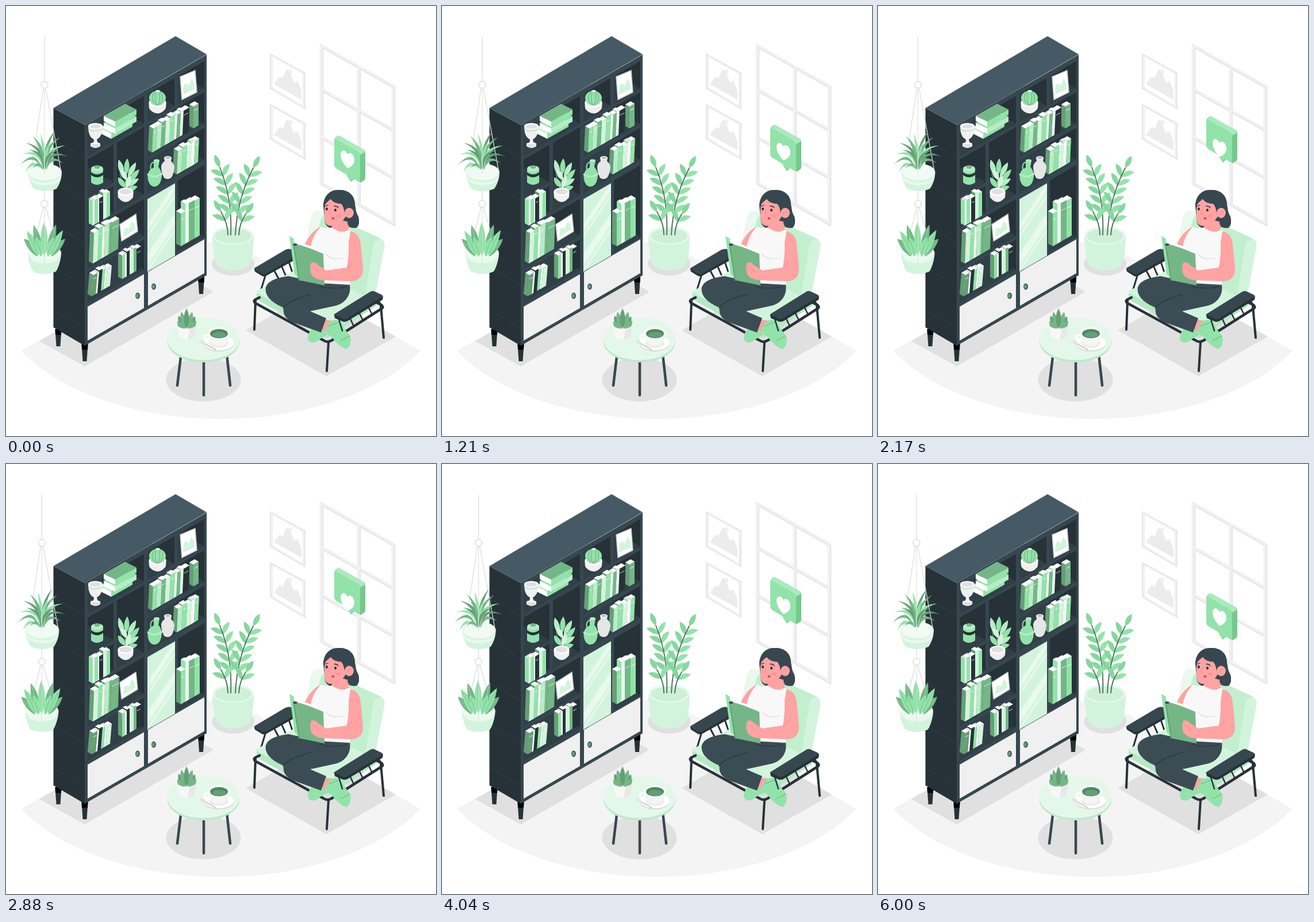
Recreate the animation shown at these times as an HTML page. Size 748 by 748 pixels, loop 6.04 s.

```html
<!DOCTYPE html>
<html lang="en">
<head>
<meta charset="utf-8">
<title>Reading corner</title>
<style>
html, body { margin: 0; width: 100%; height: 100%; overflow: hidden; background: #fff; }
svg { display: block; width: 100vw; height: 100vh; }
</style>
</head>
<body>
<svg id="stage" viewBox="0 0 748 748"></svg>
<script>
const C = {
  a: '#92e3a9', b: '#75b687', c: '#d3f4dc', d: '#263238', e: '#e9f9ee', f: '#669f76',
  g: '#b7ecc6', w: '#f7f7f7', front: '#37474f', top: '#455a64',
  skin: '#ffa3a3', blush: '#f28f8f', grey: '#e0e0e0', pale: '#f0f0f0'
};

// drawing helpers, all returning markup
const path = (d, fill, extra = '') => `<path d="${d}" fill="${fill}" ${extra}/>`;
const line = (d, stroke, width = 1, extra = '') =>
  `<path d="${d}" fill="none" stroke="${stroke}" stroke-width="${width}" stroke-linecap="round" stroke-linejoin="round" ${extra}/>`;
const poly = (pts, fill, extra = '') => `<polygon points="${pts}" fill="${fill}" ${extra}/>`;
const oval = (x, y, rx, ry, fill, extra = '') =>
  `<ellipse cx="${x}" cy="${y}" rx="${rx}" ry="${ry}" fill="${fill}" ${extra}/>`;
const group = (s, attr) => `<g ${attr}>${s}</g>`;

function leaf(x0, y0, x1, y1, w, bend, fill) {
  const dx = x1 - x0, dy = y1 - y0, len = Math.hypot(dx, dy);
  const ctrl = k => `${(x0 + x1) / 2 - dy / len * k} ${(y0 + y1) / 2 + dx / len * k}`;
  return path(`M${x0} ${y0}Q${ctrl(bend + w)} ${x1} ${y1}Q${ctrl(bend - w)} ${x0} ${y0}Z`, fill);
}

// points on the shelf front: u across, v down
const SLOPE = 0.578;
const at = (u, v) => `${137 + u},${(207 + v - SLOPE * u).toFixed(1)} `;
const face = (u0, v0, u1, v1, fill) => poly(at(u0, v0) + at(u1, v0) + at(u1, v1) + at(u0, v1), fill);

function cell(u0, v0, u1, v1) {
  const d = Math.min(55, u1 - u0, (v1 - v0) / (2 * SLOPE)), back = v1 - d * 2 * SLOPE;
  return face(u0, v0, u1, v1, C.d) +
    poly(at(u0, v1) + at(u1, v1) + at(u1 - d, back) + at(u0, back), '#314047');
}

// spec: width, colour key and height change of each spine, from the left
function books(x, y, h, spec, lean = 0, depth = 7) {
  const drop = depth * SLOPE;
  let out = '';
  for (const item of spec.split(' ')) {
    const [, w, key, dh] = item.match(/(\d+)(\w)(.*)/);
    const W = +w, H = h + +dh, x2 = x + W, y2 = y - W * SLOPE, l = lean;
    const side = poly(`${x},${y} ${x + l},${y - H} ${x + l - depth},${y - H - drop} ${x - depth},${y - drop}`,
      key === 'd' ? '#1c262b' : key === 'w' || key === 'e' ? C.a : C.f);
    const spine = poly(`${x},${y} ${x2},${y2} ${x2 + l},${y2 - H} ${x + l},${y - H}`, C[key]);
    const pages = poly(`${x + l},${y - H} ${x2 + l},${y2 - H} ${x2 + l - depth},${y2 - H - drop} ${x + l - depth},${y - H - drop}`,
      key === 'w' ? '#e4e4e4' : '#fff');
    const band = W > 6 ? line(`M${x + l * .8 + 1.5} ${y - H * .8 - 1}L${x2 + l * .8 - 1.5} ${y2 - H * .8 + 1}`,
      key === 'w' || key === 'e' ? C.b : '#fff', 1.2, 'opacity=".6"') : '';
    out = side + spine + pages + band + out;
    x = x2; y = y2;
  }
  return out;
}

function flatBook(x, y, fill, edge) {
  return poly(`${x},${y} ${x + 20},${y + 10} ${x + 20},${y + 19} ${x},${y + 9}`, '#fff') +
    poly(`${x + 20},${y + 10} ${x + 57},${y - 11} ${x + 57},${y - 2} ${x + 20},${y + 19}`, edge) +
    poly(`${x},${y} ${x + 37},${y - 21} ${x + 57},${y - 11} ${x + 20},${y + 10}`, fill);
}

function photo(a, b, c, d, m) {
  return poly(`${a} ${b} ${c} ${d}`, '#fff', `stroke="#c9c9c9" stroke-width="1.5"`) + path(m, C.c);
}

function pot(x, top, bottom, r, ry, fill, rim, inside) {
  const k = r * .68;
  return path(`M${x - r} ${top}C${x - r} ${top + 14} ${x - k - 3} ${bottom - 8} ${x - k} ${bottom - 4}Q${x} ${bottom + 4} ${x + k} ${bottom - 4}C${x + k + 3} ${bottom - 8} ${x + r} ${top + 14} ${x + r} ${top}Z`, fill) +
    oval(x, top, r, ry, rim) + oval(x, top, r - 3, ry - 2, inside);
}

function floor() {
  return path('M373.5 400L26 600A397 229 0 0 0 721 600Z', '#f4f4f4') +
    poly('58,583 137,627 361,497 282,453', C.grey) +
    poly('417,564 557,644 678,575 538,495', C.grey) +
    oval(343.5, 650, 65, 38, C.grey) + oval(395, 448, 37, 21, C.grey);
}

function wall() {
  const frame = y => {
    const p = s => `M${459 + s} ${y + s * 1.4}L${521 - s} ${y + 34 + s * .4}V${y + 98 - s * 1.4}L${459 + s} ${y + 62 - s * .4}Z`;
    return path(p(0), '#e6e6e6') + path(p(2), '#f0f0f0') + path(p(5), '#fff') +
      path(`M466 ${y + 54}L475 ${y + 42}Q478 ${y + 40} 481 ${y + 44}L487 ${y + 30}Q490 ${y + 26} 494 ${y + 33}L501 ${y + 52}L504 ${y + 49}Q507 ${y + 48} 509 ${y + 53}L514 ${y + 66}V${y + 81}Z`, '#ececec') +
      oval(495, y + 32, 3, 4, '#f0f0f0');
  };
  const grid = 'M3 4H128V243H3ZM68 4V243M3 80H128M3 163H128';
  return frame(82) + frame(170) +
    group(line(grid, '#e6e6e6', 6.5) + line(grid, '#f2f2f2', 3.5, 'transform="translate(-1 -1)"'),
      'transform="matrix(1 .565 0 1 546 64)"');
}

function shelf() {
  let s = '';
  for (const [x, y] of [[91, 562], [137, 588], [339.5, 471]])
    s += poly(`${x - 5.5},${y} ${x + 5.5},${y} ${x + 3.5},${y + 30} ${x - 3.5},${y + 30}`, C.d) +
      poly(`${x - 5.5},${y} ${x + 5.5},${y} ${x + 5},${y + 10} ${x - 5},${y + 10}`, '#000');
  s += poly('82.5,177.5 137,207 137,591 82.5,559', C.d) + poly('82.5,177.5 295,52.5 349,84 137,207', C.top) +
    face(0, 0, 212, 384, C.front);
  for (const y of [264, 338, 412, 486, 560]) s += line(`M83 ${y - 31}L137 ${y}`, '#36444b', .8);
  const cells = [
    [5, 9, 103, 57], [5, 63, 50, 129], [5, 135, 50, 181], [56, 63, 103, 181], [5, 188, 103, 252],
    [5, 259, 103, 311], [109, 9, 156, 57], [162, 9, 208, 57], [109, 63, 208, 118],
    [109, 125, 208, 181], [162, 190, 208, 315]
  ];
  for (const c of cells) s += cell(...c);

  s += face(5, 319, 103, 378, C.pale) + face(110, 319, 208, 378, C.pale) + face(109, 192, 157, 318, C.c);
  for (const [v, h] of [[214, 12], [232, 5], [266, 20], [292, 5]])
    s += poly(at(109, v + 22) + at(157, v - 22) + at(157, v - 22 + h) + at(109, v + 22 + h), C.e);
  for (const [x, y] of [[229, 504], [257, 488]])
    s += oval(x, y, 4, 5.6, '#455a64') + oval(x - .6, y, 2.4, 3.6, C.f);

  // upper left: stacked books and a trophy
  s += flatBook(163, 212, C.c, C.a) + flatBook(170, 203, C.a, C.g) + flatBook(170, 191, C.b, C.a);
  s += path('M143 209Q143 228 153 232L152 240H160L158 232Q168 227 168 209Z', C.pale) +
    oval(155.5, 209, 12.5, 5.5, '#fff') + oval(155.5, 209.5, 10, 4, C.grey) +
    line('M145 214Q150 220 166 215', C.g, 2) +
    path('M147 239Q156 235 164 239V244Q156 250 147 244Z', '#fff') + oval(155.5, 243, 8, 3.5, C.grey);

  // tin
  s += path('M148 283V307Q158 315 169 307V283Z', C.a) + oval(158.5, 283, 10.5, 5.5, C.g) +
    path('M148 289Q158 297 169 289V294Q158 302 148 294Z', C.d) + oval(158.5, 280, 5, 3, C.b);

  // potted leaves
  s += line('M208 322Q204 295 212 270M208 322Q212 300 226 287M208 320Q198 304 198 280', C.f, 1.2);
  for (const [x0, y0, x1, y1, k] of [[209, 294, 211, 265, 'a'], [204, 296, 196, 267, 'g'], [210, 303, 200, 284, 'c'],
    [212, 298, 226, 272, 'g'], [212, 308, 232, 284, 'a'], [209, 314, 231, 300, 'g'], [207, 316, 195, 298, 'a'], [209, 318, 216, 294, 'c'], [209, 320, 229, 314, 'a']])
    s += leaf(x0, y0, x1, y1, 9, 0, C[k]);
  s += pot(208, 323, 341, 13.5, 7, C.pale, '#fff', C.grey);

  // upright books
  s += books(151, 382, 43, '3w 6a 2w 7d-2 6c3 6a-1');
  s += books(151, 448, 53, '8c 7a4 4w 8g3 4b2 13b', 2);
  s += books(149, 505, 37, '7f 3w 6d2 5a 3w 8c-2', 3);
  s += books(202, 475, 41, '5a 3w 5d2 7c-1 5b 8d-3');
  s += books(254, 255, 42, '7a 8g 7b2 8c 8a3 4w 6b 5e2 10d', 2);
  s += books(326, 213, 38, '9b', 0);
  s += books(297, 293, 41, '8g 8a2 8c-2 6w1 7a', 2);
  s += books(304, 418, 57, '8a 6e12 10b10 9a8', 0, 8);

  // photos, cactus and vases
  s += photo('303,123', '329,112', '332,150', '306,163', 'M308 154L309 138L314 134L318 139L323 126L328 136V145Z');
  s += photo('198,380', '226,362', '229,392', '201,409', 'M204 402L205 389L209 385L213 388L219 374L224 380L225 389Z');
  s += pot(263.5, 168, 187, 15, 8, C.pale, '#fff', C.grey) + oval(263.5, 160, 14.5, 12.5, C.a);
  for (const r of [4, 9]) s += oval(263.5, 160, r, 12, 'none', `stroke="${C.b}" stroke-width="1.2"`);
  s += oval(264, 148, 4, 2, C.c);
  s += path('M257 269H267L265 280Q271 287 271 295Q270 309 263 313Q256 316 251 311Q245 303 247 292Q249 284 257 281Z', C.a) +
    oval(262, 269, 5, 2.5, C.g) + line('M257 272Q250 273 252 285', C.a, 2) + line('M247 293Q258 301 271 292', C.g, 3);
  s += path('M275 264H288L287 270Q293 275 293 281Q291 295 287 299Q281 303 275 299Q270 290 270 279Q271 273 276 270Z', '#e6e6e6') +
    oval(281.5, 264, 6.5, 3, '#fff') + oval(281.5, 264, 4.5, 2, '#bdbdbd');
  return s;
}

function floorPlant() {
  let s = '';
  // leaves in pairs along curved stems
  const stem = (x0, y0, cx, cy, x1, y1, n, from) => {
    let leaves = '';
    for (let i = 0; i <= n; i++) {
      const t = from + (1 - from) * i / n, q = 1 - t;
      const x = q * q * x0 + 2 * q * t * cx + t * t * x1, y = q * q * y0 + 2 * q * t * cy + t * t * y1;
      const dir = Math.atan2(q * (cy - y0) + t * (y1 - cy), q * (cx - x0) + t * (x1 - cx));
      const len = 27 - 3 * t;
      for (const side of i === n ? [0] : [-1, 1]) {
        const a = dir + side * .8;
        leaves += leaf(x, y, x + Math.cos(a) * len, y + Math.sin(a) * len, 9, side * -3, side > 0 ? C.a : '#86d79e');
      }
    }
    s += leaves + line(`M${x0} ${y0}Q${cx} ${cy} ${x1} ${y1}`, '#4a6b58', 1.8);
  };
  stem(391, 398, 394, 335, 372, 281, 5, .3);
  stem(399, 398, 402, 335, 430, 282, 5, .3);
  stem(386, 398, 386, 378, 374, 358, 1, .6);
  stem(405, 398, 406, 378, 417, 362, 1, .6);
  return path('M359 399C359 420 362 440 367 450Q378 460 395 460Q414 460 424 450C428 440 431 420 431 399Z', C.c) +
    oval(395, 399, 36, 16, C.e) + oval(395, 400, 32, 13, '#cdf0d7') + s;
}

function chair() {
  return line('M434 513L432 563M652 522L657 577M561 585L558 635', C.d, 4) +
    path('M520 420L531 367Q535 354 548 357L651 404Q660 409 658 420L641 510L590 530Z', '#c2efce') +
    path('M531 367Q535 354 548 357L560 362Q549 364 547 374L536 420L521 415Z', C.e) +
    path('M640 411Q647 407 651 404Q660 409 658 420L641 510L623 515Z', C.c) +
    line('M452 466L442 499M467 461L475 476M480 454L487 470M492 445L498 463', C.d, 3) +
    path('M436 496L520 450L650 518L566 572Q560 575 552 571L442 512Q435 508 436 496Z', C.c) +
    path('M436 499L554 560Q560 562 566 559L644 514L644 521L566 574Q560 578 552 574L442 514Q435 510 436 499Z', '#b4e9c3') +
    line('M441 507L433 511Q430 514 434 517L553 582Q559 586 566 582L654 526Q657 523 653 520L645 516', C.d, 4.5) +
    path('M432 456Q431 459 434 461L446 467Q451 468 455 465L500 439V424Q492 421 486 424Z', C.front) +
    path('M432 458L433 462L446 470Q451 471 455 468L500 443V438L455 464Q451 467 446 466Z', C.d);
}

function woman() {
  let s = '';
  // back hair, neck, far arm
  s += path('M555 376Q557 388 577 388L596 384Q606 388 611 385Q616 378 613 366C608 360 609 353 607 345C607 328 594 319 579 320C562 319 552 332 552 348Z', C.front);
  s += path('M545 385Q529 394 519 416L517 428L535 434L548 405Z', C.skin);
  s += path('M548 384Q559 389 574 383L594 389Q608 393 606 407L603 466L597 486Q562 489 540 478L529 445Q526 405 548 384Z', '#f8f8f8');
  s += path('M574 370L597 376L596 389Q584 398 566 385Z', C.skin);
  s += line('M557 432Q567 444 588 438', '#dedede', 1.2) + line('M531 418Q532 430 541 434', '#e3e3e3', 1.2);
  // legs
  s += path('M549 545L573 548L566 568L543 564Z', C.skin);
  s += path('M549 562L531 563Q523 571 526 582Q535 590 545 580L560 571Z', C.a);
  s += path('M452 497C449 482 464 473 492 470L545 482L598 485C601 505 588 517 575 521L529 531L557 543Q552 557 548 568L501 551Q480 542 483 525Q455 513 452 497Z', '#3b4c55');
  s += line('M482 526Q490 512 530 502M545 488Q570 494 593 488', C.d, 1.2);
  s += path('M559 555Q567 543 581 547Q588 562 599 574Q602 590 592 597Q578 592 566 575Q557 571 556 562Z', C.a);
  s += line('M582 582Q590 579 597 574M560 557Q570 553 582 549', C.b, 1.2);
  // book
  s += poly('493,400 501,405 511,477 502,466', C.a) + path('M499 407L509 410L548 425L553 431L511 420Z', '#fff') +
    path('M500 414Q510 413 552 431L554 486L510 477Z', C.b) + line('M500 414L510 477', C.f, 2) + oval(503, 415, 3.5, 2, C.front);
  // near arm
  s += path('M599 392Q615 395 617 414L621 455Q622 477 601 479L552 477Q537 476 531 467Q527 455 531 447Q537 444 542 450L557 460L593 455Q597 430 596 412Z', C.skin);
  s += line('M531 453Q538 456 545 463M594 455Q600 452 602 446', C.blush, 1.1);
  // face
  s += path('M555 345Q552 365 556 378Q562 386 576 380Q590 373 592 362L593 340L575 332L558 336Z', C.skin);
  s += path('M552 350C553 331 564 320 580 320C597 320 608 332 607 350L594 353L589 361Q588 349 583 344Q571 344 565 336Q558 340 552 350Z', C.front);
  s += oval(597, 360, 8, 9, C.skin) + line('M594 362Q597 356 601 358', C.blush, 1.2);
  s += path('M600 369Q607 364 606 350C609 360 615 367 614 378Q610 386 598 384Q592 380 595 371Z', C.front);
  s += oval(558, 353, 2, 2.6, C.d) + oval(573, 355, 2, 2.6, C.d);
  s += line('M555 348L560 346.5M571 348Q576 348 578 351', C.d, 1.3) + line('M564 354Q560 362 565 363', C.blush, 1.2);
  s += oval(569, 369.5, 2.5, 2, '#b8545c') + oval(578, 365, 4, 3, C.blush, 'opacity=".6"');
  // near armrest
  s += line('M579 545L585 565M597 540L604 555M613 531L620 545M629 521L636 535M646 510L653 520', C.d, 2.5);
  s += path('M571 536Q570 539 573 541L586 546Q590 547 594 545L655 507Q657 504 653 502L640 496Q636 495 632 498Z', C.front) +
    path('M571 537L572 543L586 549Q590 550 594 548L655 511L656 505L594 543Q590 546 586 544Z', C.d);
  return s;
}

function table() {
  let s = line('M304.5 606L298 660M344 617V677M384 606L390 660', C.front, 4.5) +
    oval(343.5, 583, 63, 37, '#bfe9cb') + oval(343.5, 579, 63, 37, '#e4f8ea');
  for (const [x, y, k] of [[300, 539, 'f'], [329, 540, 'f'], [305, 532, 'b'], [324, 532, 'b'], [314, 526, 'f'], [298, 549, 'b'], [331, 548, 'b']])
    s += leaf(314 + (x - 314) * .3, 562, x, y, 9, 0, C[k]);
  s += path('M298 557Q314 566 331 557L328 576Q314 585 301 576Z', '#f7f7f7') + path('M331 557L328 576Q323 580 316 580L320 561Z', '#e8e8e8');
  s += oval(370, 588, 26, 13, '#dadada') + oval(370, 586, 26, 13, '#fff') + oval(370, 587, 17, 8, '#eee');
  s += line('M353 573Q344 571 345 578Q348 585 357 582', '#fff', 3);
  s += path('M352 569Q352 584 361 589Q370 592 379 589Q389 584 389 569Z', '#f5f5f5') +
    oval(370.5, 569, 18.5, 10, '#fff') + oval(370.5, 570, 15.5, 8, '#4f8862') + oval(371, 572, 12, 5, C.f);
  s += line('M343 586L365 598', '#cfcfcf', 2) + oval(342, 585, 5, 2.5, '#e4e4e4', 'transform="rotate(28 342 585)"');
  return s;
}

function bubble() {
  return path('M571 233Q572 229 577 226Q579 225 582 227L621 249Q625 251 625 255V299Q625 302 622 304L617 307L606 300L600 306L594 297Z', '#74c98d') +
    path('M571 233L577 226Q579 225 582 227L621 249L625 254L616 259Z', '#a9ebbc') +
    path('M571 234Q571 230 575 232L612 253Q616 256 616 260V303Q616 307 612 305L604 300L599 305L592 293L575 283Q571 280 571 276Z', C.a);
}

function hanging() {
  const rope = '#dedede';
  let s = line('M67 54V131M65 143L44 284M69 143L95 284', rope, 1.3) + oval(67, 137, 6, 6, 'none', `stroke="${rope}" stroke-width="1.5"`);
  s += pot(68, 289, 322, 29, 15, C.c, C.e, '#f1fbf4') + path('M40 293Q44 306 68 307Q92 306 96 293L94 303Q88 311 68 312Q48 311 42 303Z', C.e);
  const tips = [[25, 276], [28, 258], [35, 238], [46, 226], [60, 222], [85, 217], [94, 228], [103, 243], [108, 262], [100, 274],
    [34, 290], [40, 250], [53, 238], [78, 234], [92, 250], [46, 282]];
  tips.forEach(([x, y], i) => {
    s += leaf(67 + (x - 67) * .1, 285, x, y, 5, (67 - x) * .75, [C.b, C.a, C.f][i % 3]);
  });
  s += line('M67 143V290', rope, 1.1) + line('M67 322V338M65 350L45 430M69 350L93 430', rope, 1.3) +
    oval(67, 344, 6, 6, 'none', `stroke="${rope}" stroke-width="1.5"`);
  s += pot(67, 429, 466, 29, 14, C.c, C.e, '#f1fbf4');
  for (const [x, y, k] of [[31, 405, 'b'], [103, 405, 'b'], [36, 391, 'a'], [99, 390, 'a'], [48, 381, 'b'], [87, 380, 'b'], [66, 376, 'a'], [52, 402, 'a'], [83, 402, 'a']]) {
    const x0 = 67 + (x - 67) * .35;
    s += leaf(x0, 436, x, y, 12, (67 - x) * .12, C[k]);
    s += line(`M${x0} 432L${x + (67 - x) * .1} ${y + 6}`, k === 'a' ? C.b : C.a, .8);
  }
  s += path('M39 431Q67 447 95 431Q93 440 86 444Q67 452 48 444Q41 440 39 431Z', C.e) + line('M67 350V452', rope, 1.1);
  return s;
}

const heart = path('M594 282C588 276 582 267 582 259C582 250 590 248 594 258C598 252 606 259 606 268C606 276 599 281 594 282Z', '#fff');

document.getElementById('stage').innerHTML =
  floor() + wall() + shelf() + floorPlant() + chair() + woman() + table() +
  group(bubble(), 'id="bubble"') + group(heart, 'id="heart"') + group(hanging(), 'id="hanging"');

const LOOP = 6040, STEP = 40;
// time, bubble lift, heart lift
const lift = [[0, 0, 0], [1210, -19, -13.5], [2170, -34, -20], [3010, -46.5, -28], [4040, -28.5, -21], [4880, -17.5, -12.5], [6040, 0, 0]];
// sideways swing at each half beat
const swing = [0, -2.6, 3, -6.5, 8, -6.5, 4.5, -5.6, 2.7, -2.6, 0];
const part = id => document.getElementById(id);
const parts = { bubble: part('bubble'), heart: part('heart'), hanging: part('hanging') };

function pose(t) {
  const i = Math.max(1, lift.findIndex(k => k[0] >= t)), p = lift[i - 1], n = lift[i];
  const k = (t - p[0]) / (n[0] - p[0]), mix = c => p[c] + (n[c] - p[c]) * k;
  parts.bubble.setAttribute('transform', `translate(0 ${mix(1).toFixed(2)})`);
  parts.heart.setAttribute('transform', `translate(0 ${mix(2).toFixed(2)})`);
  const beat = t / 604, b = Math.floor(beat), ease = (1 - Math.cos((beat - b) * Math.PI)) / 2;
  const x = swing[b] + (swing[b + 1] - swing[b]) * ease;
  parts.hanging.setAttribute('transform', `translate(${x.toFixed(2)} 0)`);
}

const start = performance.now();
function tick() {
  const t = (performance.now() - start) % LOOP;
  pose(Math.floor(t / STEP) * STEP);
  requestAnimationFrame(tick);
}
pose(0);
requestAnimationFrame(tick);
</script>
</body>
</html>
```
